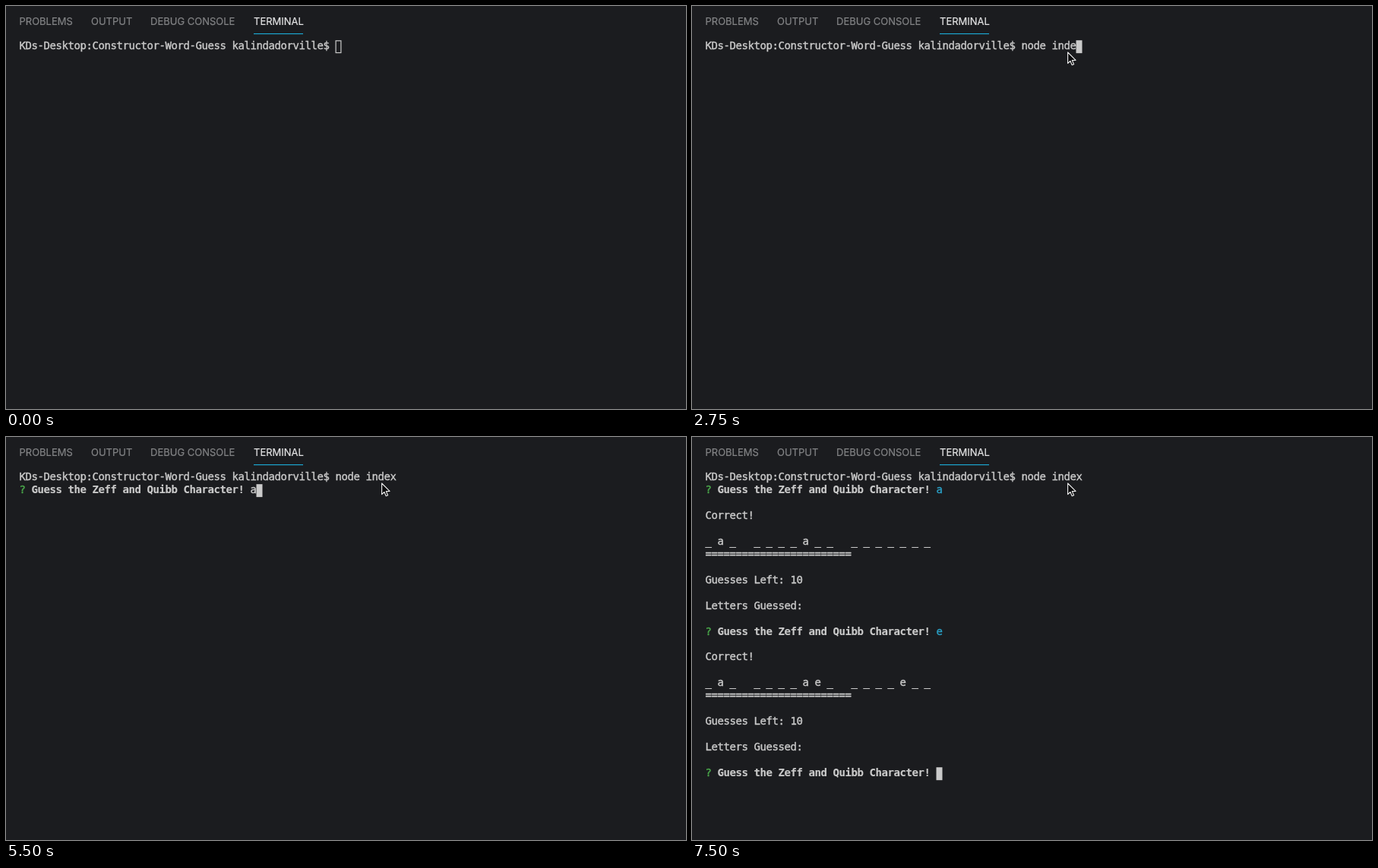
Animation, 895 px wide and 531 px high, one loop 8 s. Source, as an HTML page with a canvas:

```html
<!DOCTYPE html>
<html lang="en">
<head>
<meta charset="utf-8">
<title>Terminal word game</title>
<style>
  html, body { margin: 0; width: 100%; height: 100%; overflow: hidden; background: #1b1c1f; }
  canvas { display: block; width: 895px; height: 531px; }
</style>
</head>
<body>
<canvas id="stage"></canvas>
<script>
const W = 895, H = 531, LOOP = 8000;
const LEFT = 17.5, TOP = 45.2, COL = 8, ROW = 16.957;
const MONO = '14px "DejaVu Sans Mono", monospace';
const C = { bg: '#1b1c1f', text: '#cacaca', dim: '#828385', active: '#e4e4e5',
            line: '#1ba6cf', green: '#4aa84a', cyan: '#2aa0c6' };

const canvas = document.getElementById('stage');
const ctx = canvas.getContext('2d');
const dpr = window.devicePixelRatio || 1;
canvas.width = W * dpr;
canvas.height = H * dpr;

const PROMPT = 'KDs-Desktop:Constructor-Word-Guess kalindadorville$ ';
const COMMAND = 'node index';
const QUESTION = 'Guess the Zeff and Quibb Character! ';
const TABS = [['PROBLEMS', 17.5], ['OUTPUT', 112], ['DEBUG CONSOLE', 190], ['TERMINAL', 326]];

// [time, characters typed]
const TYPING = [[2000, 2], [2250, 4], [2500, 7], [2750, 9], [3250, 10]];

// A thin outline gives the heavier look of smoothed terminal type
function inkText(str, x, y, color, outline) {
  ctx.fillStyle = ctx.strokeStyle = color;
  ctx.lineWidth = outline;
  ctx.lineJoin = 'round';
  ctx.fillText(str, x, y);
  ctx.strokeText(str, x, y);
}

function print(str, col, row, color = C.text, weight = '') {
  ctx.font = weight + ' ' + MONO;
  ctx.letterSpacing = '0px';
  // Fit the font's advance to the terminal cell
  ctx.letterSpacing = COL - ctx.measureText('0').width + 'px';
  inkText(str, LEFT + col * COL, TOP + row * ROW + 11.9, color, weight ? 0.15 : 0.4);
}

function drawTabs() {
  ctx.font = '13px Inter, sans-serif';
  ctx.letterSpacing = '0px';
  for (const [name, x] of TABS) {
    inkText(name, x, 25, name === 'TERMINAL' ? C.active : C.dim, 0.2);
  }
  ctx.fillStyle = C.line;
  ctx.fillRect(326, 36, 65, 1.2);
}

function drawCursor(col, row, hollow) {
  const x = LEFT + col * COL, y = TOP + row * ROW;
  if (hollow) {
    ctx.strokeStyle = C.text;
    ctx.lineWidth = 1.2;
    ctx.lineJoin = 'miter';
    ctx.strokeRect(x + 0.6, y + 0.6, COL - 1.2, ROW - 1.2);
  } else {
    ctx.fillStyle = C.text;
    ctx.fillRect(x, y, COL, ROW);
  }
}

function drawPointer(x, y) {
  ctx.save();
  ctx.translate(x, y);
  ctx.beginPath();
  ctx.moveTo(0, 0);
  for (const [px, py] of [[0, 14.6], [3.3, 11.5], [5.6, 16.8], [8, 15.8], [5.7, 10.6], [10.4, 10.4]]) {
    ctx.lineTo(px, py);
  }
  ctx.closePath();
  ctx.fillStyle = '#0c0c0d';
  ctx.fill();
  ctx.strokeStyle = '#f0f0f0';
  ctx.lineWidth = 1.1;
  ctx.stroke();
  ctx.restore();
}

function ask(row, answer = '', color = C.cyan) {
  print('?', 0, row, C.green);
  print(QUESTION, 2, row, C.text, 'bold');
  print(answer, 2 + QUESTION.length, row, color);
}

function showResult(row, word) {
  print('Correct!', 0, row);
  print(word, 0, row + 2);
  print('='.repeat(24), 0, row + 3);
  print('Guesses Left: 10', 0, row + 5);
  print('Letters Guessed:', 0, row + 7);
}

function drawGame(t) {
  const end = 2 + QUESTION.length;
  if (t < 4000) return drawCursor(0, 1);
  if (t < 5750) {
    const answer = t < 5500 ? '' : 'a';
    ask(1, answer, C.text);
    return drawCursor(end + answer.length, 1);
  }
  ask(1, 'a');
  showResult(3, '_ a _   _ _ _ _ a _ _   _ _ _ _ _ _ _');
  if (t < 7250) {
    ask(12);
    return drawCursor(end, 12);
  }
  ask(12, 'e');
  showResult(14, '_ a _   _ _ _ _ a e _   _ _ _ _ e _ _');
  ask(23);
  drawCursor(end, 23);
}

function draw(t) {
  ctx.setTransform(dpr, 0, 0, dpr, 0, 0);
  ctx.fillStyle = C.bg;
  ctx.fillRect(0, 0, W, H);
  drawTabs();

  const typed = TYPING.reduce((n, [at, count]) => t >= at ? count : n, 0);
  print(PROMPT + COMMAND.slice(0, typed), 0, 0);
  if (t < 3500) drawCursor(PROMPT.length + typed, 0, t < 1250);
  else drawGame(t);

  if (t >= 1000) drawPointer(494.6, 61);
  else if (t >= 750) drawPointer(510.6, 49.6);
}

const start = performance.now();
function tick() {
  draw((performance.now() - start) % LOOP);
  requestAnimationFrame(tick);
}
tick();
</script>
</body>
</html>
```
